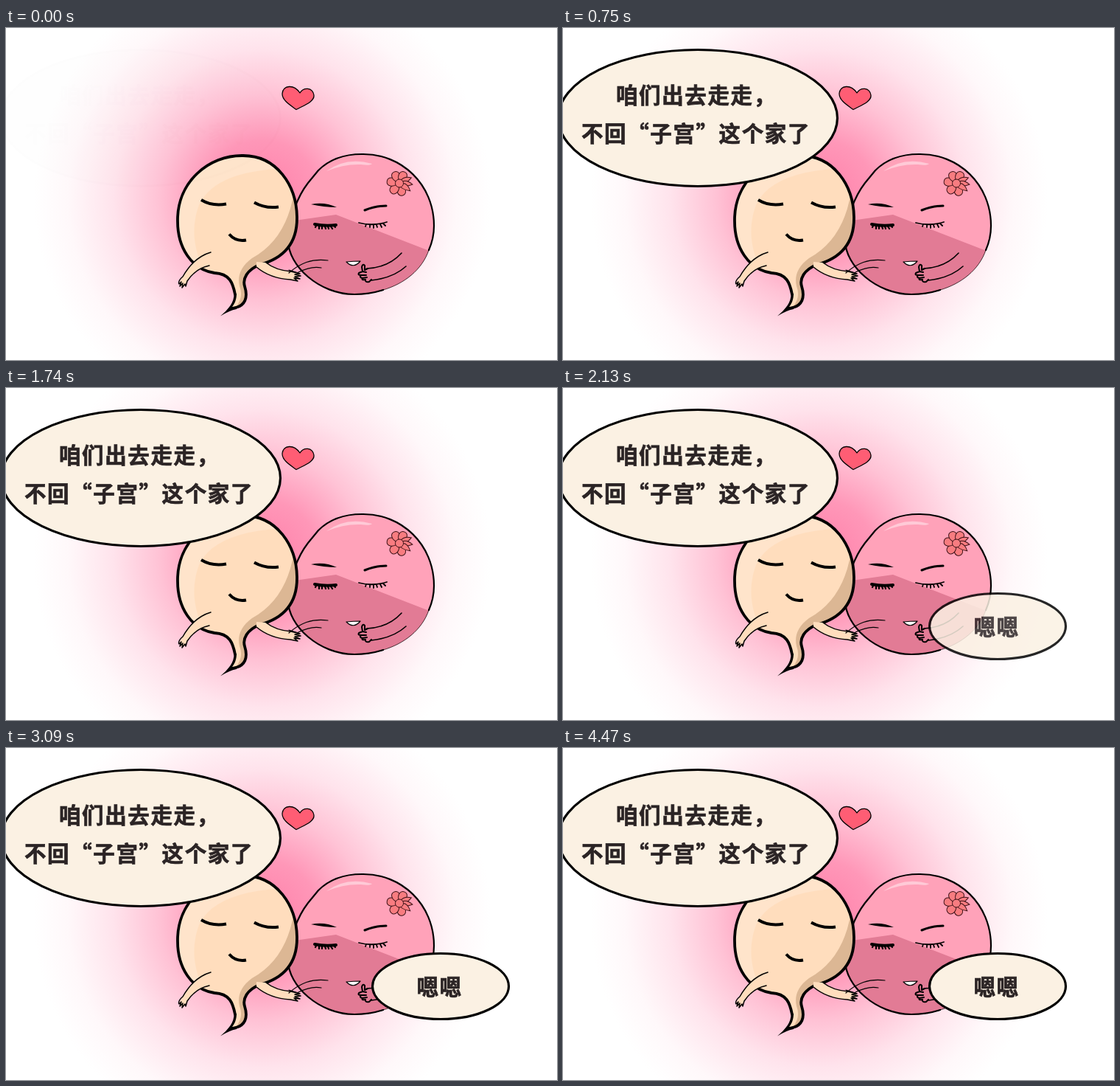
An HTML page for the animation above (4500 ms loop, 748 px wide and 450 px high).

```html
<!DOCTYPE html>
<html lang="zh-CN">
<head>
<meta charset="utf-8">
<style>
html, body { margin: 0; width: 100%; height: 100%; overflow: hidden; background: #fff; }
svg { display: block; width: 748px; height: 450px; }
.ink { fill: none; stroke: #000; stroke-linecap: round; stroke-linejoin: round; }
.bubble { opacity: 0; }
.bubble ellipse { fill: #fbf1e3; stroke: #000; stroke-width: 3.2; }
text { font: 900 29.5px "Noto Sans CJK SC", "Noto Sans CJK", sans-serif; letter-spacing: 1.6px; fill: #2b2425; stroke: #2b2425; stroke-width: .7; }
</style>
</head>
<body>
<svg viewBox="0 0 748 450">
  <defs>
    <radialGradient id="glow" gradientUnits="userSpaceOnUse" cx="348" cy="230" r="310">
      <stop offset="0" stop-color="#ff7fa9"/>
      <stop offset=".25" stop-color="#ff97b8"/>
      <stop offset=".45" stop-color="#ffc2d5"/>
      <stop offset=".65" stop-color="#ffe3ec"/>
      <stop offset=".85" stop-color="#fff8fa"/>
      <stop offset="1" stop-color="#fff"/>
    </radialGradient>
    <path id="pinkShape" d="M574 301C565 328 540 347 512 355C500 359 487 361 473 361C425 361 383 322 383 288C384 258 396 228 410 210L424 193C440 177 460 171 483 171C537 170 581 212 581 268Q581 285 574 301"/>
    <path id="creamShape" d="M322 173C367 173 395 213 395 258C395 291 378 312 344 321C327 328 321 340 324 350C329 366 324 376 312 379C304 380 300 384 291 390C302 382 312 372 311 361C308 346 304 333 283 332C251 327 233 297 233 262C232 209 275 172 322 173Z"/>
    <clipPath id="inPink"><use href="#pinkShape"/></clipPath>
    <clipPath id="inCream"><use href="#creamShape"/></clipPath>
  </defs>

  <rect width="748" height="450" fill="url(#glow)"/>

  <path class="ink" style="fill:#ff5d74" stroke-width="1.300" d="M394 110.500C385 104 375 98 375 89C376 77 391 76 399 88C404 80 416 80 418 91C419 100 404 105 394 110.500Z"/>

  <g id="pink">
    <use href="#pinkShape" fill="#ffa2b9"/>
    <path clip-path="url(#inPink)" fill="#e27b95" d="M370 264L448 253L590 308V370H370Z"/>
    <path fill="#ffcad7" d="M435 194Q462 174 497 184Q494 187 482 185Q459 184 435 194Z"/>
    <path class="ink" stroke-width="2.200" d="M512 355C500 359 487 361 473 361C425 361 383 322 383 288C384 258 396 228 410 210L424 193C440 177 460 171 483 171C537 170 581 212 581 268Q581 285 574 301"/>
    <path class="ink" stroke-width=".7" d="M574 301C565 328 540 347 512 355"/>
    <path d="M414 239Q432 235 449 243Q432 243 414 239Z"/>
    <path class="ink" stroke-width="3" d="M487 247Q501 241 516 241"/>
    <path class="ink" stroke-width="4" d="M419 266Q434 269 448 267"/>
    <path class="ink" stroke-width="2.200" d="M421 268l-1 2M425 269v3M429 269v3M433 269l1 3M437 269l1 3M441 269l2 3M445 268l2 2"/>
    <path class="ink" stroke-width="1.800" d="M479 264Q498 269 517 263M489 266l-1 3M494 267v3M499 267v4M503 267l1 3M508 266l2 4M512 265l3 3"/>
    <path class="ink" style="fill:#fff" stroke-width="1.200" d="M462 317Q472 316 481 316Q472 327 462 317Z"/>
    <path class="ink" stroke-width="1.600" d="M537 305C527 316 512 325 490 326M543 323C530 335 514 340 496 342"/>
    <path class="ink" stroke-width="2" d="M491 326L487 328V322Q484 319 483 324L484 330L479 332Q477 335 482 335Q479 338 484 339Q482 342 488 341Q487 345 493 344L496 341M484 330L489 331M482 335H489M484 339L490 338"/>
    <g id="flower" transform="translate(534 210.500)" fill="#f87c80" stroke="#3a1015"></g>
  </g>

  <g id="cream">
    <use href="#creamShape" fill="#ffddbd"/>
    <g clip-path="url(#inCream)">
      <path fill="#ffe4cb" d="M395 190Q285 190 262 240Q245 285 272 335H220V165H395Z"/>
      <path fill="#dcb794" d="M393 205Q387 283 334 312Q312 328 317 350Q323 365 312 378L330 382L345 325L402 310V200Z"/>
    </g>
    <path class="ink" stroke-width="3.800" d="M311 361C308 346 304 333 283 332C251 327 233 297 233 262C232 209 275 172 322 173C367 173 395 213 395 258C395 291 378 312 344 321C327 328 321 340 324 350C329 366 324 376 312 379"/>
    <path d="M309.500 360H313C313 369 310 374 307 378L313 377V381Q303 383 291 390.500C302 381 310 372 309.500 360Z"/>
    <path class="ink" style="stroke-linecap:butt" stroke-width="4" d="M265 233Q280 242 299 238.500M337 236.500Q352 245 370 242.500M303 279.500Q312 290 326 287.500"/>
    <g transform="translate(-1 1)">
      <path fill="#ffddbd" d="M280 303C262 308 250 320 241 336L236 345L240 350L247 343C253 333 262 324 278 321Z"/>
      <path class="ink" stroke-width="1.500" d="M279 303C262 308 250 320 241 336Q234 342 236 346L239 343L237 349L241 345L240 351L244 346L245 349L247 342C253 333 262 324 277 321"/>
      <path fill="#ffddbd" d="M341 316L354 317C364 325 376 328 388 329L400 333L396 341L387 340C370 339 354 334 341 323Z"/>
      <path class="ink" stroke-width="1.500" d="M354 317C364 325 376 328 388 329L400 332L393 333L401 335L393 336L400 339L392 338L397 342L387 340C370 339 354 334 341 323"/>
    </g>
    <path class="ink" stroke-width="1.200" d="M384 332C399 319 415 312 437 315M397 331C409 325 419 323 428 325M384 328L397 332"/>
  </g>

  <g class="bubble" data-start="0" data-length="400">
    <ellipse cx="183" cy="122" rx="189.500" ry="92.500"/>
    <text x="72" y="102">咱们出去走走，</text>
    <text x="25" y="154">不回“子宫”这个家了</text>
  </g>
  <g class="bubble" data-start="1750" data-length="450">
    <ellipse cx="590" cy="323" rx="92.500" ry="44.500"/>
    <text x="557.500" y="334.500">嗯嗯</text>
  </g>
</svg>
<script>
const LOOP = 4500;
const round = 'M3 -2C9 -8 17 -6 17 0C17 6 9 8 3 2Z';
const pointed = 'M4 -3Q10 -6 18 0Q10 4 4 3Z';
const petal = (angle, shape) => `<path transform="rotate(${angle})" d="${shape}"/>`;
document.getElementById('flower').innerHTML =
  [75, 130, 190, 245, 295].map(angle => petal(angle, round)).join('') +
  [-25, 5, 35].map(angle => petal(angle, pointed)).join('') +
  '<circle r="5.500"/>';

const bubbles = [...document.querySelectorAll('.bubble')];
function draw() {
  const t = performance.now() % LOOP;
  for (const bubble of bubbles) {
    const { start, length } = bubble.dataset;
    bubble.style.opacity = Math.min(1, Math.max(0, (t - start) / length));
  }
  requestAnimationFrame(draw);
}
draw();
</script>
</body>
</html>
```
